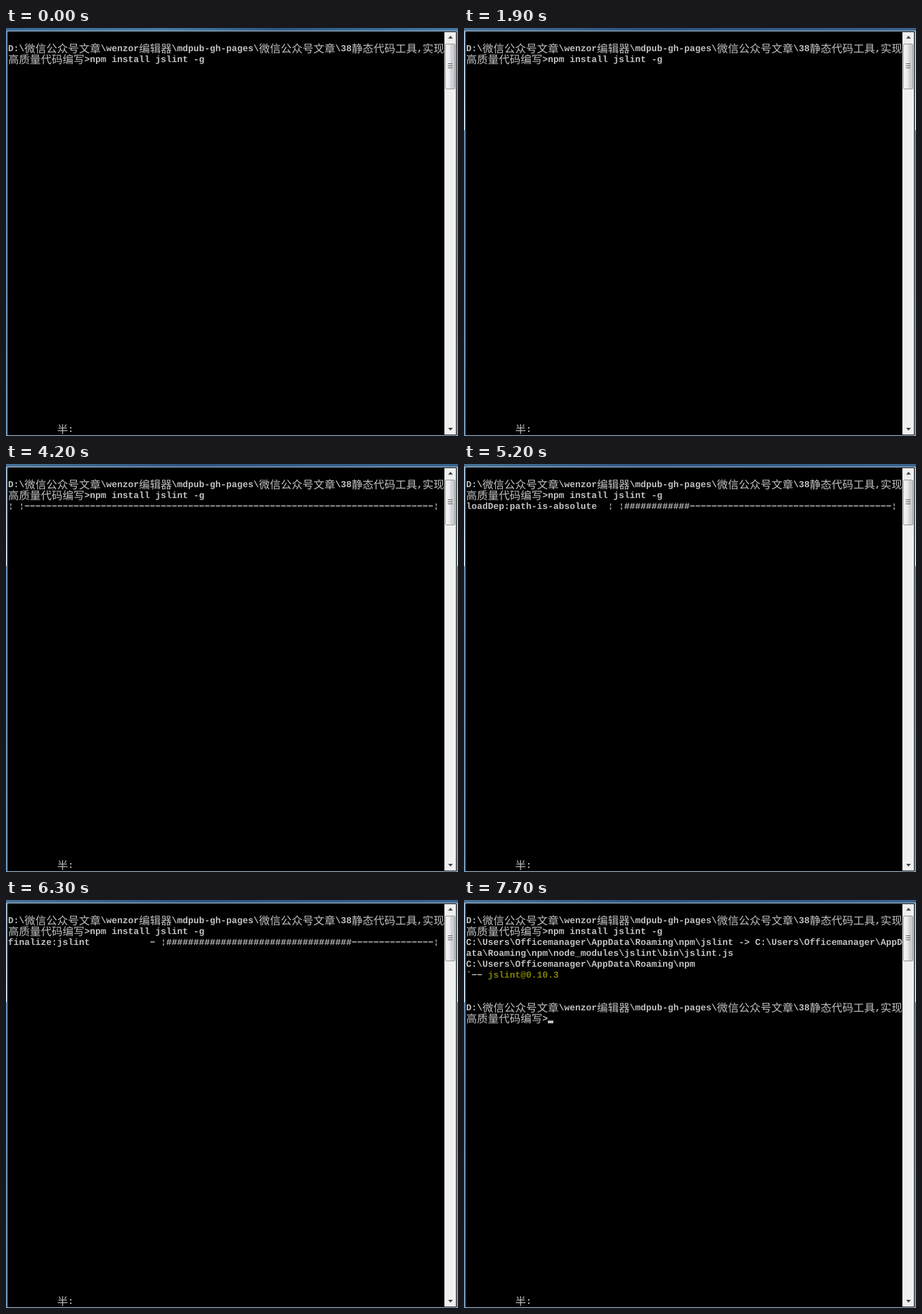
These frames come from a looping animation (663 px wide and 599 px high, 8000 ms). An HTML page:

```html
<!DOCTYPE html>
<html lang="zh-CN">
<head>
<meta charset="utf-8">
<title>npm install</title>
<style>
html, body { margin: 0; width: 100%; height: 100%; overflow: hidden; background: #000; }
svg { display: block; width: 663px; height: 599px; }
text { fill: #c0c0c0; text-rendering: geometricPrecision; }
.latin { font: bold 13.333px "Liberation Mono", monospace; }
.cjk { font: 300 16px "Noto Sans CJK SC", "Noto Sans CJK", sans-serif; }
.pipe { font: bold 10px "Liberation Mono", monospace; }
.olive text { fill: #808000; }
</style>
</head>
<body>
<svg viewBox="0 0 663 599">
  <defs>
    <linearGradient id="top">
      <stop offset="0" stop-color="#3a6c98"/>
      <stop offset=".35" stop-color="#4a7ba4"/>
      <stop offset=".6" stop-color="#2f5a85"/>
      <stop offset="1" stop-color="#4679a5"/>
    </linearGradient>
    <linearGradient id="topLater">
      <stop offset="0" stop-color="#4a7397"/>
      <stop offset=".4" stop-color="#2f5680"/>
      <stop offset="1" stop-color="#3b658f"/>
    </linearGradient>
    <linearGradient id="side" x2="0" y2="1">
      <stop offset="0" stop-color="#3a6c9a"/>
      <stop offset=".5" stop-color="#305f90"/>
      <stop offset="1" stop-color="#4a7ca6"/>
    </linearGradient>
    <linearGradient id="sideLater" x2="0" y2="1">
      <stop offset="0" stop-color="#8fb0cb"/>
      <stop offset=".25" stop-color="#d3e2ee"/>
      <stop offset=".25" stop-color="#305f92"/>
      <stop offset="1" stop-color="#4a7ca6"/>
    </linearGradient>
    <linearGradient id="thumb">
      <stop offset="0" stop-color="#f6f6f6"/>
      <stop offset=".48" stop-color="#e9e9eb"/>
      <stop offset=".52" stop-color="#d8d8dc"/>
      <stop offset="1" stop-color="#c3c3c8"/>
    </linearGradient>
  </defs>
  <rect id="desk" width="663" height="599"/>
  <rect id="title" width="663" height="4"/>
  <rect x="1.5" y="4.5" width="660" height="594" fill="#000" stroke="#a9c6de"/>
  <g id="scroll">
    <rect x="643" y="6" width="17" height="591" fill="#f0f0f0"/>
    <rect x="643" y="6" width="1" height="591" fill="#e3e3e3"/>
    <rect x="644.5" y="23.5" width="14" height="66" rx="1.5" fill="url(#thumb)" stroke="#979797"/>
    <path d="M648 52.5h7M648 55.5h7M648 58.5h7" stroke="#606060"/>
    <path d="M648.5 15.5h7L652 11.5zM648.5 587h7L652 591z" fill="#404040"/>
  </g>
  <g id="fixed"></g>
  <g id="output"></g>
  <rect id="cursor" width="8" height="4" fill="#c0c0c0"/>
</svg>
<script>
const LOOP = 8000, CELL = 8, LEFT = 3;
const $ = id => document.getElementById(id);
const rowTop = row => 6 + 16 * row;

const PROMPT = "D:\\微信公众号文章\\wenzor编辑器\\mdpub-gh-pages\\微信公众号文章\\38静态代码工具,实现";
const PROMPT_END = "高质量代码编写>";
const HOME = "C:\\Users\\Officemanager\\AppData\\Roaming\\npm";

// Wide characters take two cells; every run is placed on the grid.
function line(top, str) {
  let col = 0, out = "";
  for (const [run] of str.matchAll(/ +|¦|[!-~−]+|[^\x00-\x7f¦−]+/g)) {
    const wide = /[\u4e00-\u9fff]/.test(run);
    const kind = wide ? "cjk" : run === "¦" ? "pipe" : "latin";
    const dx = kind === "pipe" ? 1 : 0;
    const dy = { cjk: 14, pipe: 10.5, latin: 12 }[kind];
    const safe = run.replace(/&/g, "&amp;").replace(/</g, "&lt;").replace(/>/g, "&gt;");
    if (run.trim())
      out += `<text class="${kind}" x="${LEFT + col * CELL + dx}" y="${top + dy}">${safe}</text>`;
    col += run.length * (wide ? 2 : 1);
  }
  return out;
}

// time, task, spinner, filled cells
const progress = [
  [4200, "", "¦", 0],
  [4300, "", "/", 0],
  [4500, "", "−", 0],
  [4700, "loadDep:glob", "\\", 6],
  [4800, "loadDep:nopt", "¦", 8],
  [4900, "loadDep:readable-stream", "/", 10],
  [5100, "loadDep:minimatch", "\\", 11],
  [5200, "loadDep:path-is-absolute", "¦", 12],
  [5400, "loadDep:inflight", "/", 12],
  [5500, "loadDep:once", "−", 13],
  [5600, "loadDep:wrappy", "\\", 13],
  [5700, "loadDep:inherits", "¦", 13],
  [5800, "loadDep:isarray", "/", 14],
  [5900, "loadDep:abbrev -> request", "\\", 14],
  [6000, "loadDep:core-util-is", "¦", 16],
  [6200, "extract:jslint", "/", 25],
  [6300, "finalize:jslint", "−", 34]
];

function progressLine([, task, spin, filled]) {
  const head = (task && task.padEnd(26)) + spin + " ¦";
  return head + "#".repeat(filled) + "−".repeat(78 - head.length - filled) + "¦";
}

function output(t) {
  if (t < 6600) {
    const step = progress.filter(p => p[0] <= t).pop();
    return step ? line(rowTop(3), progressLine(step)) : "";
  }
  let out = line(rowTop(3), HOME + "\\jslint -> C:\\Users\\Officemanager\\AppD") +
    line(rowTop(4), "ata\\Roaming\\npm\\node_modules\\jslint\\bin\\jslint.js");
  if (t < 6700) return out;
  out += line(rowTop(5), HOME) + line(rowTop(6), "`−−") +
    `<g class="olive">${line(rowTop(6), "    jslint@0.10.3")}</g>`;
  if (t < 6800) return out + line(rowTop(9), PROMPT.replace(/[\u4e00-\u9fff]/g, "  "));
  return out + line(rowTop(9), PROMPT) + line(rowTop(10), PROMPT_END);
}

// from, to, column, row
const blinks = [
  [400, 900, 36, 2],
  [1400, 1900, 0, 3],
  [2400, 2700, 0, 3],
  [2800, 3300, 0, 3],
  [3800, 4200, 0, 3],
  [7700, LOOP, 15, 10]
];

let shown = null;
function draw(t) {
  const later = t >= 400 ? "Later" : "";
  $("desk").setAttribute("fill", `url(#side${later})`);
  $("title").setAttribute("fill", `url(#top${later})`);

  const html = output(t);
  if (html !== shown) $("output").innerHTML = shown = html;

  const blink = blinks.find(([from, to]) => t >= from && t < to);
  $("cursor").setAttribute("visibility", blink ? "visible" : "hidden");
  if (blink) {
    $("cursor").setAttribute("x", LEFT + blink[2] * CELL);
    $("cursor").setAttribute("y", rowTop(blink[3]) + 11);
  }
}

$("fixed").innerHTML = line(rowTop(1), PROMPT) +
  line(rowTop(2), PROMPT_END + "npm install jslint -g") +
  line(581, " ".repeat(9) + "半:");

const start = performance.now();
function frame() {
  draw((performance.now() - start) % LOOP);
  requestAnimationFrame(frame);
}
frame();
</script>
</body>
</html>
```
